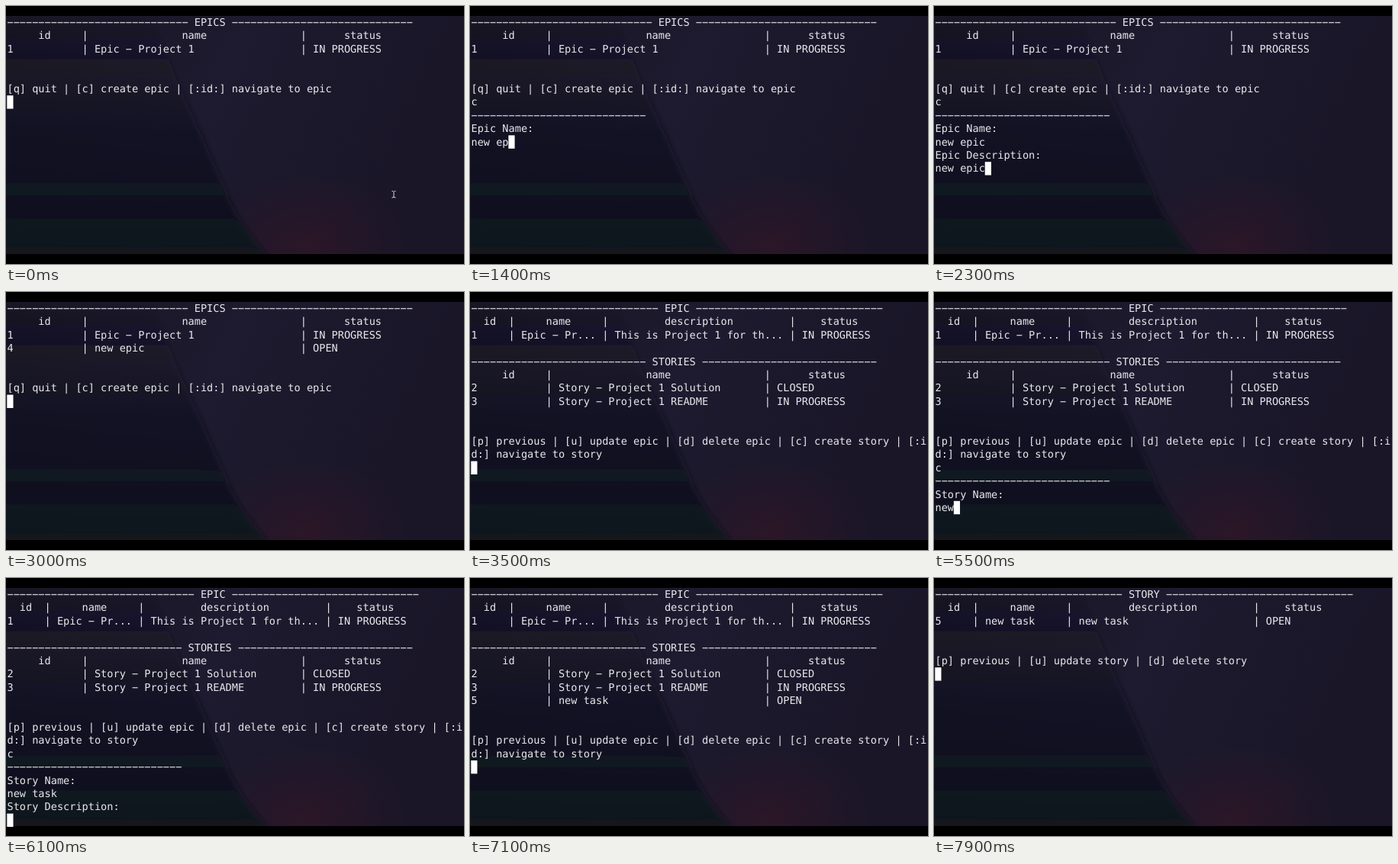
Write an HTML page that moves like this. It is 600 px wide and 338 px high and loops after 8 s.

```html
<!DOCTYPE html>
<html lang="en">
<head>
<meta charset="utf-8">
<title>Epic tracker in a terminal</title>
<style>
html, body { margin: 0; width: 100%; height: 100%; overflow: hidden; background: #000; }
svg { display: block; }
text {
  font: 13.59px "DejaVu Sans Mono", monospace;
  fill: #e9e8ec;
  white-space: pre;
  text-rendering: geometricPrecision;
}
</style>
</head>
<body>
<svg width="600" height="338" viewBox="0 0 600 338">
  <defs>
    <linearGradient id="base" x1="0" y1="0" x2="1" y2="0.25">
      <stop offset="0" stop-color="#191625"/>
      <stop offset="0.5" stop-color="#1e1a2f"/>
      <stop offset="1" stop-color="#1a1628"/>
    </linearGradient>
    <linearGradient id="shade" x1="0" y1="0" x2="0" y2="1">
      <stop offset="0" stop-color="#141320" stop-opacity="0"/>
      <stop offset="0.45" stop-color="#141422" stop-opacity="0.75"/>
      <stop offset="1" stop-color="#12131f"/>
    </linearGradient>
    <radialGradient id="glow">
      <stop offset="0" stop-color="#301626" stop-opacity="0.75"/>
      <stop offset="1" stop-color="#301626" stop-opacity="0"/>
    </radialGradient>
    <clipPath id="window"><rect y="13" width="600" height="312"/></clipPath>
    <filter id="soft"><feGaussianBlur stdDeviation="3"/></filter>
  </defs>
  <rect width="600" height="338"/>
  <g clip-path="url(#window)">
    <rect y="13" width="600" height="312" fill="url(#base)"/>
    <ellipse cx="395" cy="315" rx="130" ry="95" fill="url(#glow)"/>
    <path d="M-20 13H195C215 90 250 150 280 225S325 300 350 340H-20Z" fill="url(#shade)" filter="url(#soft)"/>
  </g>
  <g id="rows"></g>
  <rect id="cursor" width="8.2" height="17.4" fill="#fff"/>
  <path id="pointer" d="M505.5 242.5H507L508 243.5L509 242.5H510.5M508 243.5V250M505.5 251H507L508 250L509 251H510.5" fill="none" stroke="#d8d8dc"/>
</svg>
<script>
const LOOP = 8000, COLUMNS = 73, ROWS = 18;
const LEFT = 1.5, TOP = 12.8, CELL = 8.18, LINE = 17.4, BASELINE = 13.2;
const CLEAR = '\f';

const rule = n => '-'.repeat(n);
const title = (name, n) => `${rule(n)} ${name} ${rule(n)}`;
const center = (s, width) => s.padStart((width + s.length) >> 1).padEnd(width);
const header = (names, widths) => names.map((s, i) => center(s, widths[i])).join('|');
const record = (cells, widths) =>
  cells.map((s, i) => ((i ? ' ' : '') + s).padEnd(widths[i])).join('|');

const LIST = [12, 34, 18], DETAIL = [6, 14, 29, 14];
const list = items => [header(['id', 'name', 'status'], LIST), ...items.map(r => record(r, LIST))];
const detail = item => [header(['id', 'name', 'description', 'status'], DETAIL), record(item, DETAIL)];
const screen = (...lines) => CLEAR + lines.join('\n') + '\n';

const epics = items => screen(
  title('EPICS', 29), ...list(items), '', '',
  '[q] quit | [c] create epic | [:id:] navigate to epic');

const epic = stories => screen(
  title('EPIC', 30),
  ...detail(['1', 'Epic - Pr...', 'This is Project 1 for th...', 'IN PROGRESS']), '',
  title('STORIES', 28), ...list(stories), '', '',
  '[p] previous | [u] update epic | [d] delete epic | [c] create story | [:id:] navigate to story');

const story = item => screen(
  title('STORY', 30), ...detail(item), '', '',
  '[p] previous | [u] update story | [d] delete story');

const firstEpic = ['1', 'Epic - Project 1', 'IN PROGRESS'];
const stories = [
  ['2', 'Story - Project 1 Solution', 'CLOSED'],
  ['3', 'Story - Project 1 README', 'IN PROGRESS'],
];

// One entry per 100 ms, starting at the given time.
const type = (start, keys) => keys.map((key, i) => [start + i * 100, key]);

const script = [
  [0, epics([firstEpic])],
  [100, 'c'],
  [400, `\n${rule(28)}\nEpic Name:\n`],
  ...type(900, [...'new epic']),
  [1700, '\nEpic Description:\n'],
  ...type(1800, ['n', 'e', 'w ', 'e', 'pi', 'c']),
  [2400, epics([firstEpic, ['4', 'new epic', 'OPEN']])],
  [3300, '1'],
  [3500, epic(stories)],
  [4700, 'c'],
  [4900, `\n${rule(28)}\nStory Name:\n`],
  ...type(5200, ['n', 'e']),
  ...type(5500, [...'w task']),
  [6100, '\nStory Description:\n'],
  ...type(6200, ['n', 'e', 'w', ' ', 't', 'a', 'sk']),
  [7000, epic([...stories, ['5', 'new task', 'OPEN']])],
  [7500, '5'],
  [7800, story(['5', 'new task', 'new task', 'OPEN'])],
];

const byId = id => document.getElementById(id);
const cursor = byId('cursor'), pointer = byId('pointer');
const rows = Array.from({ length: ROWS }, (_, i) => {
  const row = document.createElementNS('http://www.w3.org/2000/svg', 'text');
  row.setAttribute('x', LEFT);
  row.setAttribute('y', TOP + i * LINE + BASELINE);
  return byId('rows').appendChild(row);
});

const wrap = line => line.match(new RegExp(`.{1,${COLUMNS}}`, 'g')) || [''];

let shown = -1;
function render(time) {
  const count = script.filter(([at]) => at <= time).length;
  if (count === shown) return;
  shown = count;
  const output = script.slice(0, count).map(entry => entry[1]).join('');
  const lines = output.split(CLEAR).pop().split('\n').flatMap(wrap);
  // The minus sign has the wide dash of the terminal face.
  rows.forEach((row, i) => { row.textContent = (lines[i] || '').replace(/-/g, '\u2212'); });
  cursor.setAttribute('x', LEFT + lines.at(-1).length * CELL - 0.2);
  cursor.setAttribute('y', TOP + (lines.length - 1) * LINE);
  pointer.style.display = count > 1 ? 'none' : '';
}

const origin = performance.now();
function tick() {
  render((performance.now() - origin) % LOOP);
  requestAnimationFrame(tick);
}
tick();
</script>
</body>
</html>
```
